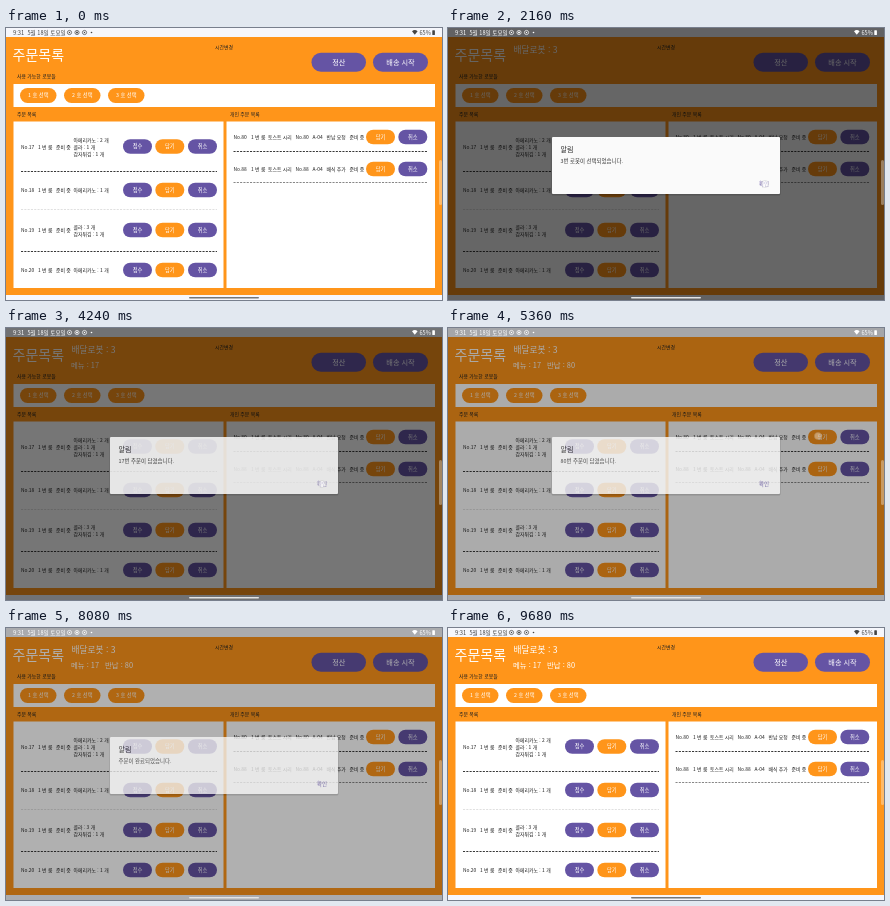
These frames come from a looping animation (436x272 px, 9760 ms). An HTML page:

```html
<!DOCTYPE html>
<html lang="ko">
<head>
<meta charset="utf-8">
<title>주문목록</title>
<style>
  html, body { margin: 0; width: 100%; height: 100%; overflow: hidden; background: #ff951a; }
  svg { display: block; width: 436px; height: 272px; }
  text { font-family: "Noto Sans CJK KR", "Noto Sans CJK", "Noto Sans", sans-serif; white-space: pre; }
</style>
</head>
<body>
<svg id="stage" viewBox="0 0 436 272"></svg>
<script>
const LOOP = 9760, STEP = 80, DIM = 0.6;
const ORANGE = '#ff951a', PURPLE = '#6554a4', INK = '#222';
const stage = document.getElementById('stage');

function add(tag, attrs, parent = stage) {
  const el = document.createElementNS('http://www.w3.org/2000/svg', tag);
  for (const key in attrs) el.setAttribute(key, attrs[key]);
  return parent.appendChild(el);
}
const rect = (x, y, width, height, fill, parent, rx = 0) =>
  add('rect', { x, y, width, height, fill, rx }, parent);

// y is the vertical middle of the line
function label(str, x, y, size, fill, parent, extra = {}) {
  const el = add('text', { x, y: y + size * 0.37, 'font-size': size, fill, ...extra }, parent);
  el.textContent = str;
  return el;
}
function button(str, x, cy, w, h, size, fill) {
  rect(x, cy - h / 2, w, h, fill, stage, h / 2);
  label(str, x + w / 2, cy, size, '#fff', stage, { 'text-anchor': 'middle', 'font-weight': 500 });
}
const divider = (x1, x2, y, opacity = 1) => add('line', {
  x1, x2, y1: y, y2: y, stroke: '#222', 'stroke-width': 0.9, 'stroke-dasharray': '2.1 1.2', opacity
});

// Page
rect(0, 0, 436, 272, ORANGE);
rect(0, 0, 436, 9, '#f6f7fc');
rect(0, 267, 436, 5, '#f6f7fc');
label('주문목록', 6.5, 26.5, 14, '#fff');
label('시간변경', 209, 19.5, 4.9, INK);
button('정산', 305.5, 34.3, 54.5, 19, 7.2, PURPLE);
button('배송 시작', 367, 34.3, 55, 19, 7.2, PURPLE);
label('사용 가능한 로봇들', 11, 48.5, 4.9, INK);
rect(7.5, 56, 421.5, 23, '#fff');
[14, 58, 102].forEach((x, i) => button(`${i + 1} 호 선택`, x, 67.5, 36.5, 15, 5.3, ORANGE));
label('주문 목록', 11, 86, 4.9, INK);
label('개인 주문 목록', 224, 86, 4.9, INK);
rect(7.5, 93.5, 210, 166.5, '#fff');
rect(220.5, 93.5, 208.5, 166.5, '#fff');

const robotText = label('배달로봇 : 3', 65.5, 22, 8.7, '#fff');
const menuText = label('메뉴 : 17', 65, 37.5, 7.4, '#fff');
const returnText = label('반납 : 80', 99, 37.5, 7.4, '#fff');

// Orders
const orders = [
  [118.5, ['아메리카노 : 2 개', '콜라 : 1 개', '감자튀김 : 1 개']],
  [162, ['아메리카노 : 1 개']],
  [202, ['콜라 : 3 개', '감자튀김 : 1 개']],
  [242, ['아메리카노 : 1 개']]
];
orders.forEach(([cy, items], i) => {
  label('No.' + (17 + i), 15, cy + 0.5, 4.9, INK);
  label('1 번 룸', 32, cy + 0.5, 4.9, INK);
  label('준비 중', 50, cy + 0.5, 4.9, INK);
  items.forEach((item, k) =>
    label(item, 67.5, cy + 0.5 + (k - (items.length - 1) / 2) * 7, 4.9, INK));
  button('접수', 117, cy, 29, 14.5, 5.3, PURPLE);
  button('담기', 149.3, cy, 29, 14.5, 5.3, ORANGE);
  button('취소', 182, cy, 29, 14.5, 5.3, PURPLE);
});
divider(15, 211, 143.5);
divider(15, 211, 181.5, 0.15);
divider(15, 211, 223.5);

[[109, 'No.80', '반납 요청'], [141, 'No.88', '배식 추가']].forEach(([cy, no, kind]) => {
  const cells = [[no, 227.5], ['1 번 룸', 245], ['토스트 시리', 262], [no, 289.5],
    ['A-04', 306.5], [kind, 320.5], ['준비 중', 343.5]];
  cells.forEach(([str, x]) => label(str, x, cy + 0.5, 4.9, INK));
  button('담기', 360, cy, 29, 14.5, 5.3, ORANGE);
  button('취소', 392.3, cy, 29, 14.5, 5.3, PURPLE);
});
divider(227.5, 421.5, 123.5);
divider(227.5, 421.5, 154.5, 0.6);

// Alert
const shade = rect(0, 0, 436, 272, '#000');
const alertBox = add('g', {});
rect(103.5, 109.5, 229, 58, 'rgba(0,0,0,.18)', alertBox, 1.5);
rect(104, 109, 228, 57, '#fafafa', alertBox, 1);
label('알림', 112.5, 121, 7, '#222', alertBox, { 'font-weight': 500 });
const message = label('', 112.5, 132.5, 5.45, '#333', alertBox);
label('확인', 311, 156, 5.45, PURPLE, alertBox, { 'font-weight': 500 });

// System bars stay above the shade
rect(433, 132, 3, 45, 'rgba(255,255,255,.35)', stage, 1.5);
const bars = add('g', { fill: '#444' });
const cur = 'currentColor';
label('9:31', 7, 4.5, 5.8, cur, bars);
label('5월 18일 토요일', 21.5, 4.5, 5.6, cur, bars);
[63.5, 71, 78.5].forEach(cx =>
  add('circle', { cx, cy: 4.5, r: 2.1, fill: 'none', stroke: cur, 'stroke-width': 0.7 }, bars));
[[63.5, 0.7], [71, 1], [78.5, 0.7], [85.5, 0.8]].forEach(([cx, r]) =>
  add('circle', { cx, cy: 4.5, r, fill: cur }, bars));
add('path', { d: 'M406 3.2Q408.8 1 411.6 3.2L408.8 6.8Z', fill: cur }, bars);
label('65%', 413.5, 4.5, 5.6, cur, bars);
rect(426.3, 2.2, 2.6, 4.8, cur, bars, 0.6);
const pill = rect(183, 269, 70, 1.6, '#777', stage, 0.8);

const dot = add('circle', { r: 3.6, fill: '#fff', stroke: '#bbb', 'stroke-width': 0.6 });

// [opens, closes, message]
const alerts = [
  [1200, 2240, '3번 로봇이 선택되었습니다.'],
  [3280, 4210, '17번 주문이 담겼습니다.'],
  [5200, 6250, '80번 주문이 담겼습니다.'],
  [7930, 9390, '주문이 완료되었습니다.']
];
const FADE = 200, SHADE_FADE = 290;

// [start, end, x, y]
const taps = [
  [1040, 1280, 120, 67], [2160, 2400, 317, 156],
  [3120, 3360, 164, 118], [4160, 4400, 316, 156],
  [5040, 5440, 370, 108], [6240, 6480, 317, 155],
  [7680, 7920, 394, 34], [9440, 9600, 317, 156]
];

const clamp = v => Math.max(0, Math.min(1, v));
const level = (t, [open, close], span) =>
  Math.min(clamp((t - open) / span), 1 - clamp((t - close) / span));
const show = (el, on) => el.setAttribute('visibility', on ? 'visible' : 'hidden');

function draw(t) {
  const current = alerts.find(a => t > a[0] && t < a[1] + SHADE_FADE);
  alertBox.setAttribute('opacity', current ? level(t, current, FADE) : 0);
  shade.setAttribute('opacity', current ? DIM * level(t, current, SHADE_FADE) : 0);
  if (current) message.textContent = current[2];
  bars.setAttribute('color', current ? '#fff' : '#444');
  pill.setAttribute('fill', current ? '#e4e4e4' : '#777');

  [robotText, menuText, returnText].forEach((el, i) => show(el, t >= alerts[i][0]));

  const tap = taps.find(([a, b]) => t >= a && t < b);
  show(dot, tap);
  if (tap) {
    dot.setAttribute('cx', tap[2]);
    dot.setAttribute('cy', tap[3]);
    dot.setAttribute('opacity', 0.55 * clamp((tap[1] - t) / 120));
  }
}

const begin = performance.now();
function frame() {
  const t = (performance.now() - begin) % LOOP;
  draw(Math.floor(t / STEP) * STEP);
  requestAnimationFrame(frame);
}
frame();
</script>
</body>
</html>
```
